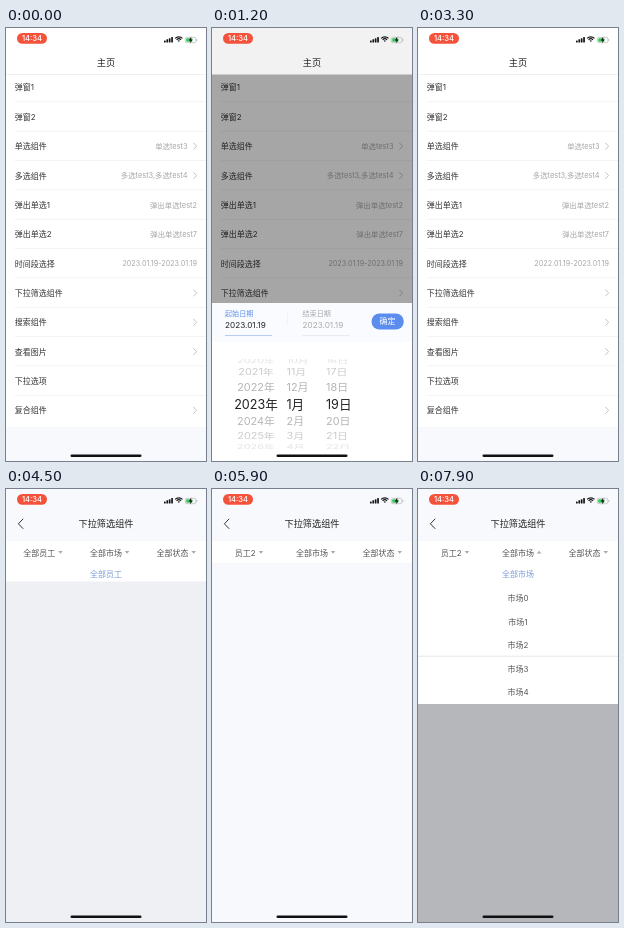
Recreate the animation shown at these times as an HTML page with a canvas. Size 200 px wide and 433 px high, loop 8 s.

```html
<!DOCTYPE html>
<html lang="zh">
<head>
<meta charset="utf-8">
<title>组件演示</title>
<style>
html, body { margin: 0; width: 100%; height: 100%; overflow: hidden; background: #fff; }
canvas { display: block; width: 100vw; height: 100vh; }
</style>
</head>
<body>
<canvas id="stage"></canvas>
<script>
const W = 200, H = 433, LOOP = 8000;
const FONT = 'Inter, "Noto Sans CJK SC", "Noto Sans CJK", sans-serif';
const PAGE_BG = '#f8f9fd', BLUE = '#5b8def';
const canvas = document.getElementById('stage');
const ctx = canvas.getContext('2d');

const ROWS = [
  ['弹窗1'], ['弹窗2'],
  ['单选组件', '单选test3', true],
  ['多选组件', '多选test3,多选test4', true],
  ['弹出单选1', '弹出单选test2'],
  ['弹出单选2', '弹出单选test7'],
  ['时间段选择', 'range'],
  ['下拉筛选组件', '', true],
  ['搜索组件', '', true],
  ['查看图片', '', true],
  ['下拉选项'],
  ['复合组件', '', true]
];

const clamp = x => Math.max(0, Math.min(1, x));
const inOut = x => x < .5 ? 4 * x ** 3 : 1 - (2 - 2 * x) ** 3 / 2;
const out = x => 1 - (1 - x) ** 3;
const ramp = (t, start, length, ease = inOut) => ease(clamp((t - start) / length));

function text(s, x, y, size, color, align = 'left', weight = 400) {
  ctx.font = `${weight} ${size}px ${FONT}`;
  ctx.fillStyle = color;
  ctx.textAlign = align;
  ctx.textBaseline = 'alphabetic';
  ctx.fillText(s, x, y + size * .37);
}

function box(x, y, w, h, color) {
  ctx.fillStyle = color;
  ctx.fillRect(x, y, w, h);
}

function pill(x, y, w, h, r, color) {
  ctx.fillStyle = color;
  ctx.beginPath();
  ctx.roundRect(x, y, w, h, r);
  ctx.fill();
}

function line(points, color, width) {
  ctx.strokeStyle = color;
  ctx.lineWidth = width;
  ctx.beginPath();
  points.forEach(([x, y]) => ctx.lineTo(x, y));
  ctx.stroke();
}

function statusBar() {
  pill(11, 5, 30, 10.8, 5.4, '#f4523b');
  text('14:34', 26, 10.4, 7.6, '#fff', 'center', 500);
  for (let i = 0; i < 4; i++) {
    const h = 2 + i * 1.15;
    pill(158 + i * 2.4, 14.5 - h, 1.7, h, .5, '#111');
  }
  ctx.strokeStyle = '#111';
  ctx.lineWidth = 1.2;
  for (const r of [1, 3.1, 5.2]) {
    ctx.beginPath();
    ctx.arc(172.8, 14, r, -Math.PI * .75, -Math.PI * .25);
    ctx.stroke();
  }
  ctx.strokeStyle = '#aaa';
  ctx.lineWidth = .6;
  ctx.beginPath();
  ctx.roundRect(179.3, 9.3, 10.6, 5.4, 1.6);
  ctx.stroke();
  pill(180.2, 10.2, 6.2, 3.6, .8, '#35c759');
  box(190.5, 11, .7, 2, '#aaa');
  ctx.fillStyle = '#111';
  ctx.beginPath();
  [[185.3, 8.6], [182.9, 12.4], [184.6, 12.4], [183.9, 15.4], [186.6, 11.4], [184.8, 11.4]]
    .forEach(([x, y]) => ctx.lineTo(x, y));
  ctx.fill();
}

function homePage(t) {
  box(0, 0, W, H, PAGE_BG);
  box(0, 0, W, 399, '#fff');
  const range = `${t < 2500 ? 2023 : 2022}.01.19-2023.01.19`;
  ROWS.forEach(([label, value, arrow], i) => {
    const y = 59.5 + i * 29.35;
    text(label, 8.7, y, 8, '#333');
    if (value === 'range') text(range, 191, y, 7.2, '#a6a6a6', 'right');
    else if (value) text(value, arrow ? 181.5 : 191, y, 7.4, '#a6a6a6', 'right');
    if (arrow) line([[187.3, y - 3.4], [190.6, y], [187.3, y + 3.4]], '#b4b4b4', .8);
    if (i < ROWS.length - 1) box(8.7, y + 14, 191.3, .6, '#ececec');
  });

  const shown = ramp(t, 400, 380, out) * (1 - ramp(t, 2200, 300));
  if (shown > 0) box(0, 46, W, H - 46, `rgba(0,0,0,${.35 * shown})`);
  const tone = Math.round(255 - 13 * shown);
  box(0, 0, W, 46, `rgb(${tone},${tone},${tone})`);
  box(0, 46, W, .6, '#e6e6e6');
  text('主页', 100, 35, 9.2, '#222', 'center', 500);
  if (shown > 0) sheet(t, 275 + 158 * (1 - shown));
}

function wheelItem(label, x, centered, d) {
  const a = d * .345, c = Math.cos(a);
  if (Math.abs(d) > 3.4) return;
  const near = clamp(1 - Math.abs(d));
  const shade = Math.round(Math.abs(d) < 1 ? 34 + 146 * Math.abs(d) : 180 + 23 * (Math.abs(d) - 1));
  ctx.save();
  ctx.translate(x, 101 + 50 * Math.sin(a));
  ctx.scale(1, c);
  text(label, 0, 0, 10.9 + 1.7 * near, `rgb(${shade},${shade},${shade})`, centered ? 'center' : 'left');
  ctx.restore();
}

function sheet(t, top) {
  const year = 2023 - ramp(t, 1300, 450);
  ctx.save();
  ctx.translate(0, top);
  box(0, 0, W, H, '#fff');
  box(0, 0, W, 39, '#fafbff');
  text('起始日期', 13, 10.7, 7.1, BLUE);
  text(`${Math.round(year)}.01.19`, 13, 21.5, 8.2, '#222');
  box(13, 32, 47, .7, '#9db8ee');
  box(75.5, 10, .6, 12, '#e8eaf0');
  text('结束日期', 90.5, 10.7, 7.1, '#aaa');
  text('2023.01.19', 90.5, 21.5, 8.2, '#aaa');
  box(90.5, 32, 47, .7, '#e2e4ea');
  const pressed = t > 2080;
  pill(159.5, 10.5, 32.3, 16, 8, pressed ? '#779fee' : BLUE);
  text('确定', 175.6, 18.4, 8, pressed ? '#c5d5f8' : '#fff', 'center');

  ctx.beginPath();
  ctx.rect(0, 56, W, 90);
  ctx.clip();
  for (let k = 2018; k <= 2028; k++) wheelItem(k + '年', 44, true, k - year);
  for (let d = -3; d <= 3; d++) {
    wheelItem((d + 12) % 12 + 1 + '月', 74.5, false, d);
    wheelItem(19 + d + '日', 114, false, d);
  }
  ctx.restore();
}

function tab(label, center, flip) {
  ctx.font = `400 8px ${FONT}`;
  const w = ctx.measureText(label).width, x = center - (w + 7.4) / 2;
  text(label, x, 63.7, 8, '#555');
  ctx.save();
  ctx.translate(x + w + 5.2, 63.2);
  ctx.rotate(Math.PI * flip);
  ctx.fillStyle = '#aaa';
  ctx.beginPath();
  ctx.moveTo(-2.3, -1.3);
  ctx.lineTo(2.3, -1.3);
  ctx.lineTo(0, 1.5);
  ctx.fill();
  ctx.restore();
}

function menu(name, picked, open) {
  if (open <= 0) return;
  box(0, 74, W, H - 74, `rgba(0,0,0,${.265 * open})`);
  ctx.save();
  ctx.beginPath();
  ctx.rect(0, 74, W, 141 * open);
  ctx.clip();
  box(0, 74, W, 141, '#fff');
  for (let i = 0; i < 6; i++) {
    const label = i ? name + (i - 1) : '全部' + name;
    text(label, 100, 85.5 + i * 23.55, 8, i === picked ? '#7d9ddb' : '#555', 'center');
  }
  ctx.restore();
}

function filterPage(t) {
  const staff = ramp(t, 4405, 300) * (1 - ramp(t, 5050, 300));
  const market = ramp(t, 6920, 300);
  box(0, 0, W, H, PAGE_BG);
  box(0, 52, W, 22, '#fff');
  line([[17.2, 29.8], [12.4, 34.8], [17.2, 39.8]], '#333', 1);
  text('下拉筛选组件', 100, 35, 9.2, '#222', 'center', 500);
  tab(t < 5000 ? '全部员工' : '员工2', 37, clamp(staff * 2 - 1));
  tab('全部市场', 103.6, clamp(market * 2 - 1));
  tab('全部状态', 170.2, 0);
  menu('员工', t < 5000 ? 0 : 3, staff);
  menu('市场', 0, market);
  if (t > 7300) box(0, 166.8, W, .7, '#dcdcdc');
}

function draw(t) {
  const push = ramp(t, 3480, 400);
  if (push < 1) {
    ctx.save();
    ctx.translate(-60 * push, 0);
    homePage(t);
    ctx.restore();
  }
  if (push > 0) {
    ctx.save();
    ctx.translate(W * (1 - push), 0);
    filterPage(t);
    ctx.restore();
  }
  statusBar();
  pill(64.5, 426.4, 71, 2.6, 1.3, '#111');
}

function fit() {
  const ratio = window.devicePixelRatio || 1;
  canvas.width = Math.round(innerWidth * ratio);
  canvas.height = Math.round(innerHeight * ratio);
}

const start = performance.now();
function tick(now) {
  ctx.setTransform(canvas.width / W, 0, 0, canvas.height / H, 0, 0);
  draw(Math.max(0, now - start) % LOOP);
  requestAnimationFrame(tick);
}
addEventListener('resize', fit);
fit();
requestAnimationFrame(tick);
</script>
</body>
</html>
```
